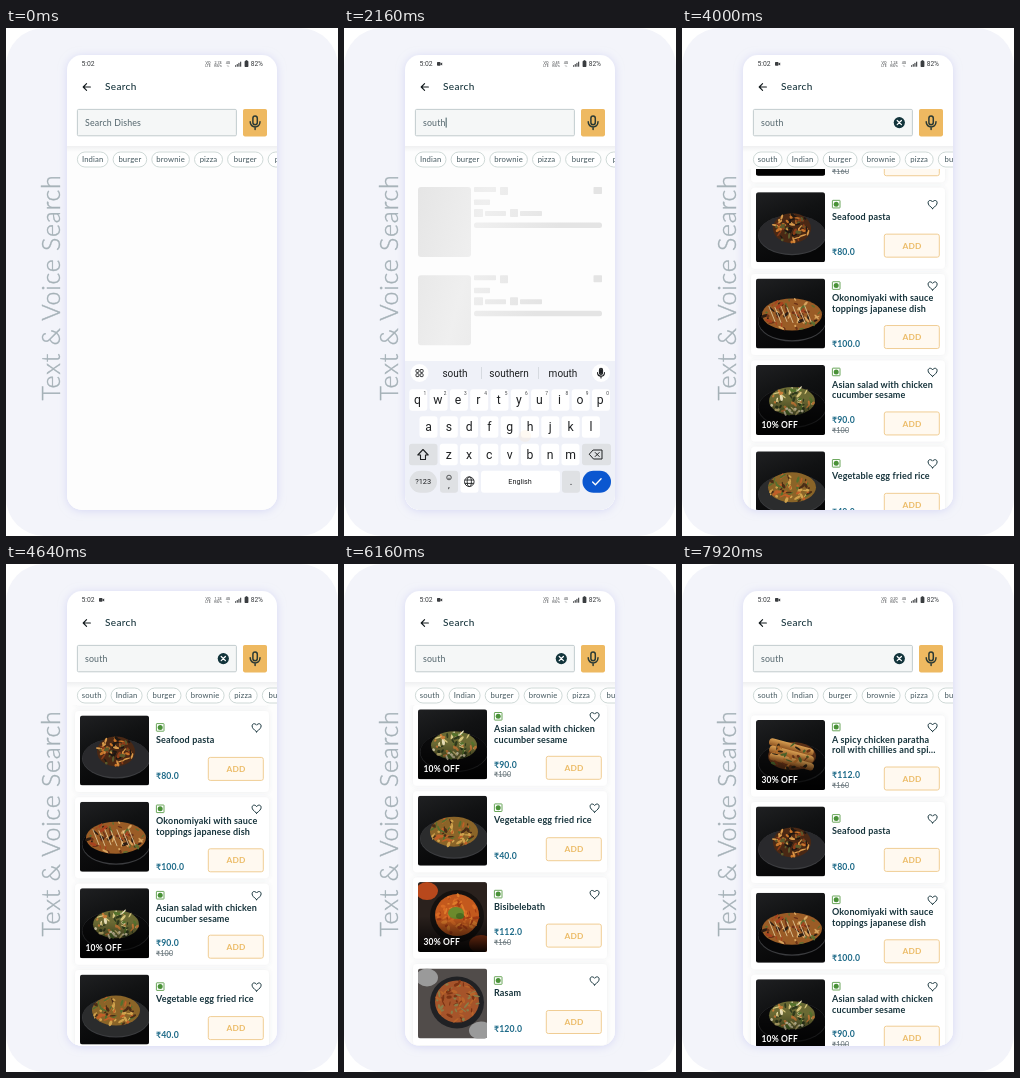
An HTML page that plays this animation: 332x508 px, repeating every 8000 ms.

```html
<!DOCTYPE html>
<html lang="en">
<head>
<meta charset="utf-8">
<title>Text & Voice Search</title>
<style>
  html, body { margin: 0; width: 100%; height: 100%; overflow: hidden; background: #fff; }
  svg { display: block; width: 332px; height: 508px; }
  text { font-family: Lato, "Noto Sans", sans-serif; letter-spacing: .15px; white-space: pre; }
  .sys text, text.sys { font-family: Roboto, "Noto Sans", sans-serif; letter-spacing: 0; }
  .mid { text-anchor: middle; }
  .bold { font-weight: 700; }
  .line { fill: none; stroke-linecap: round; stroke-linejoin: round; }
</style>
</head>
<body>
<svg id="stage" viewBox="0 0 332 508" xmlns="http://www.w3.org/2000/svg"></svg>
<script>
const LOOP = 8000, STEP = 80, PITCH = 86.4, TOP = 156;
const FOCUS = 400, KEYS_IN = 640, SUBMIT = 2360, RESULTS = 2800;
const INK = '#17343c';

const rect = (x, y, w, h, fill, r = 0, more = '') =>
  `<rect x="${x}" y="${y}" width="${w}" height="${h}" rx="${r}" fill="${fill}" ${more}/>`;
const text = (x, y, size, fill, str, more = '') =>
  `<text x="${x}" y="${y}" font-size="${size}" fill="${fill}" ${more}>${str}</text>`;
const oval = (x, y, rx, ry, fill, more = '') =>
  `<ellipse cx="${x}" cy="${y}" rx="${rx}" ry="${ry}" fill="${fill}" ${more}/>`;
const line = (d, stroke, w = 1, more = '') =>
  `<path class="line" d="${d}" stroke="${stroke}" stroke-width="${w}" ${more}/>`;
const group = (id, body, more = '') => `<g id="${id}" ${more}>${body}</g>`;

const clamp = v => Math.max(0, Math.min(1, v));
const ease = v => { v = clamp(v); return v * v * (3 - 2 * v); };

function random(seed) {
  return () => (seed = (seed * 16807) % 2147483647) / 2147483647;
}

// Dishes: title lines, price, old price, discount, load time, picture colours
const dishes = [
  { title: ['A spicy chicken paratha', 'roll with chillies and spi…'], price: 112, was: 160, off: 30, load: 2970,
    plate: '#0b0b0c', food: '#5b3016', bits: ['#48612a', '#b06a28', '#6b3216', '#2a2013'], rx: 24, ry: 14, rolls: true },
  { title: ['Seafood pasta'], price: 80, load: 3120,
    plate: '#29292c', food: '#4a2814', bits: ['#c9752a', '#8c3c18', '#1d1712', '#5b5a2c', '#d99a4a'], rx: 19, ry: 15 },
  { title: ['Okonomiyaki with sauce', 'toppings japanese dish'], price: 100, load: 2870,
    plate: '#070708', food: '#9a5c26', bits: ['#d9a45e', '#6d3418', '#5f6e30', '#a8421f', '#2c1c12'], rx: 30, ry: 16, stripes: true },
  { title: ['Asian salad with chicken', 'cucumber sesame'], price: 90, was: 100, off: 10, load: 2950,
    plate: '#0a0a0b', food: '#6b6a34', bits: ['#d8c67c', '#54722c', '#c77d38', '#e6dcb4', '#2f3a1c'], rx: 23, ry: 14 },
  { title: ['Vegetable egg fried rice'], price: 40, load: 3500,
    plate: '#2b2c2d', food: '#8a6428', bits: ['#55702e', '#c05f28', '#d0a24c', '#4a2c16'], rx: 24, ry: 15 },
  { title: ['Bisibelebath'], price: 112, was: 160, off: 30, load: 4900,
    bg: '#2a211d', plate: '#15110f', food: '#c3591d', bits: ['#de7c2b', '#a63c14', '#d96b24'], bowl: true, herbs: true, side: '#b8481c' },
  { title: ['Rasam'], price: 120, load: 5190,
    bg: '#514c4a', plate: '#202124', food: '#a6542a', bits: ['#b9642a', '#7d3414', '#8a7d48'], bowl: true, side: '#9a9a9a' },
  { title: ['Curd Rice'], price: 80, was: 100, off: 20, load: 5260,
    bg: '#b4b2b2', plate: '#d8d3c8', food: '#f3ecd4', bits: ['#e8cf74', '#fff8e2', '#b9b078'], bowl: true, side: '#d9d6d0' },
  { title: ['South Indian Delight', 'Thali'], price: 180, load: 5300,
    bg: '#dcc79c', plate: '#b39158', food: '#e6c88a', bits: ['#c98f4c', '#f1e3ba', '#a9ae70'], bowl: true, side: '#f0dfb8' }
];

function photo(d, i) {
  const rnd = random(731 * (i + 3));
  const cx = d.bowl ? 113 : 110, cy = d.bowl ? 33 : 36;
  const rx = d.rx || 22, ry = d.ry || 21;
  let s = rect(74, 0, 69, 70, d.bg || 'url(#dark)');
  if (d.bowl) s += oval(83, 9, 11, 9, d.side) + oval(137, 62, 12, 9, d.side) + oval(cx, cy + 1, rx + 5, ry + 5, d.plate);
  else s += oval(cx, 43, 34, 20, '#3b3c3f') + oval(cx, 42.4, 33.6, 19.4, d.plate);
  s += oval(cx, cy, rx, ry, d.food);
  if (d.rolls) for (let k = 0; k < 3; k++)
    s += rect(84 + k * 2, 23 + k * 7, 46, 7.6, 'url(#crust)', 3.8, 'transform="rotate(15 107 36)"');
  for (let k = 0; k < (d.rolls ? 30 : 70); k++) {
    const a = rnd() * 6.283, r = Math.sqrt(rnd()) * .95;
    const x = (cx + Math.cos(a) * rx * r).toFixed(1), y = (cy + Math.sin(a) * ry * r).toFixed(1);
    s += oval(x, y, (1.2 + rnd() * 2.6).toFixed(1), (.6 + rnd()).toFixed(1),
      d.bits[k % d.bits.length], `transform="rotate(${Math.round(rnd() * 180)} ${x} ${y})"`);
  }
  if (d.stripes) for (let k = 0; k < 7; k++)
    s += line(`M${87 + k * 6} ${28 + k % 2}l6 15`, '#e8d3a6', .8);
  if (d.herbs) s += oval(cx - 1, 31, 8, 6, '#6b8a2c') + oval(cx + 3, 34, 4, 3, '#4a6d20');
  return s;
}

function card(d, i) {
  const two = d.title.length > 1, dy = two ? 0 : 5, base = two ? 0 : -5;
  const priceY = (d.was ? 58.3 : 68.3) + base, addY = 47 + base;
  let s = rect(69, -4.5, 194, 81, '#fff', 4, 'filter="url(#soft)"');
  s += '<g clip-path="url(#thumb)">' + rect(74, 0, 69, 70, '#f5f6f6')
    + `<circle id="logo${i}" cx="107" cy="35" r="15" fill="#607f87"/>`
    + group('photo' + i, photo(d, i))
    + (d.off ? rect(74, 34, 69, 36, 'url(#shade)') + text(79.5, 63, 8.5, '#fff', d.off + '% OFF', 'class="bold"') : '')
    + '</g>';
  s += rect(150.4, 3.2 + dy, 7.6, 7.6, '#fff', .5, 'stroke="#5a9c48" stroke-width=".9"')
    + `<circle cx="154.2" cy="${7 + dy}" r="2.5" fill="#4a9238"/>`;
  s += line('M0 4.2C-3 1.8-4.5.3-4.5-1.6-4.5-4.2-1.6-4.7 0-2.4 1.6-4.7 4.5-4.2 4.5-1.6 4.5.3 3 1.8 0 4.2Z',
    INK, 1, `transform="translate(250.6 ${7.2 + dy})"`);
  d.title.forEach((t, k) => s += text(150, 22.6 + k * 10.8 + dy, 9, INK, t, 'class="bold"'));
  s += text(150, priceY, 8.7, '#1d6a88', `₹${d.price}.0`, 'class="bold"');
  if (d.was) s += text(150, priceY + 9.6, 7.2, '#5d6b71', '₹' + d.was) + rect(150, priceY + 6.9, 16, .7, '#5d6b71');
  s += rect(202.3, addY, 55, 23, '#fff9f0', 2, 'stroke="#f0cd94" stroke-width="1"')
    + text(230, addY + 14.6, 8.4, '#ecbc68', 'ADD', 'class="mid bold"');
  return group('card' + i, s);
}

function chips(names, widths) {
  let x = 71.4, s = '';
  names.forEach((n, i) => {
    s += rect(x, 124, widths[i], 15, '#fff', 7.5, 'stroke="#c3d0cd" stroke-width=".8"')
      + text(x + widths[i] / 2, 134.2, 7.7, '#44585f', n, 'class="mid"');
    x += widths[i] + 5.1;
  });
  return s;
}

function skeleton(y) {
  const bars = [[74, 0, 53, 70, 3], [130, 0, 22, 5], [156, 0, 8, 8], [249.5, 0, 8.5, 7], [130, 12.5, 16, 5.5],
    [130, 22, 9, 8], [141, 24, 21, 5], [166, 22, 8, 8], [176, 24, 22, 5], [130, 35.5, 128, 5.5, 2.5]];
  return bars.map(([x, by, w, h, r]) => rect(x, y + by, w, h, 'url(#shimmer)', r || .8)).join('');
}

function mic(x, y, k, color) {
  return `<g transform="translate(${x} ${y}) scale(${k})">`
    + rect(-2.2, -6.5, 4.4, 8.6, 'none', 2.2, `stroke="${color}" stroke-width="1.5"`)
    + line('M-4.9-.8C-4.9 6 4.9 6 4.9-.8M0 4.4V7', color, 1.5) + '</g>';
}

const keyRows = [['qwertyuiop', 74.3, 372], ['asdfghjkl', 84.5, 399], ['zxcvbnm', 104.7, 426.5]];
const keyPos = {};

function keyboard() {
  const gray = '#dfe1e4', ink = '#1e2022';
  let s = rect(61, 333, 210, 160, '#eff1f8');
  s += '<circle cx="75.5" cy="345" r="9" fill="#fff"/><circle cx="257" cy="345" r="9" fill="#fff"/>';
  for (let k = 0; k < 4; k++)
    s += rect(72 + (k % 2) * 4.2, 341.5 + (k >> 1) * 4.2, 2.9, 2.9, 'none', .7, `stroke="${ink}" stroke-width=".9"`);
  s += mic(257, 345, .72, ink) + rect(255.7, 341, 2.6, 5, ink, 1.3);
  s += rect(137, 339, .7, 12, '#ccd0d6') + rect(194, 339, .7, 12, '#ccd0d6');
  for (let k = 0; k < 3; k++) s += text(111 + k * 54, 348.6, 10, ink, '', `id="hint${k}" class="mid"`);
  keyRows.forEach(([row, x0, y], r) => [...row].forEach((c, i) => {
    const x = x0 + i * 20.3;
    keyPos[c] = [x, y];
    s += rect(x - 9, y - 10.7, 18, 21.4, '#fff', 3) + text(x - (r ? 0 : .8), y + 4, 12.2, ink, c, 'class="mid"');
    if (!r) s += text(x + 6.5, y - 5, 4.8, '#44474b', (i + 1) % 10, 'class="mid"');
  }));
  s += rect(65, 415.8, 28.5, 21.4, gray, 3) + line('M79 421.5l5.2 5.5h-2.7v4.5h-5v-4.5h-2.7Z', ink, 1.1);
  s += rect(238, 415.8, 29, 21.4, gray, 3)
    + line('M249.5 422h8.5v9h-8.5l-4-4.5ZM251.2 424.5l4 4M255.2 424.5l-4 4', ink, 1);
  s += rect(65.5, 442.8, 27.5, 22, gray, 11) + text(79.2, 456.3, 7.4, ink, '?123', 'class="mid"');
  s += rect(96, 442.8, 18, 22, gray, 3) + text(105, 459.5, 9, ink, ',', 'class="mid"')
    + '<circle cx="105" cy="449.5" r="2.3" fill="none" stroke="#1e2022" stroke-width=".7"/>' + line('M104 450.2q1 1 2 0', ink, .5);
  s += rect(116.5, 442.8, 18, 22, '#fff', 3)
    + '<g fill="none" stroke="#1e2022" stroke-width=".9"><circle cx="125.3" cy="453.7" r="4.8"/><ellipse cx="125.3" cy="453.7" rx="2.1" ry="4.8"/><path d="M120.8 452h9M120.8 455.4h9"/></g>';
  s += rect(137, 442.8, 79, 22, '#fff', 3) + text(176, 456.3, 7.2, ink, 'English', 'class="mid"');
  s += rect(218, 442.8, 18, 22, gray, 3) + text(227, 456.5, 10, ink, '.', 'class="mid"');
  s += rect(238.5, 442.8, 28.5, 22, '#0b57d0', 11) + line('M248.6 454l2.8 2.8 5.7-6', '#fff', 1.3);
  return s;
}

function statusBar() {
  const ink = '#3a3d40';
  let s = text(75.5, 38.4, 6.8, ink, '5:02');
  s += group('rec', rect(93, 34, 3.5, 3.8, ink, .7) + `<path d="M96.5 35.6l1.7-1.2v3.2l-1.7-1.2z" fill="${ink}"/>`);
  const tiny = (x, a, b, id = '') => text(x, 35.5, 3.7, ink, a, `class="mid" ${id}`) + text(x, 38.9, 3.4, ink, b, 'class="mid"');
  s += tiny(202, 'VO', 'LTE') + tiny(212, '', 'KB/s', 'id="speed"') + tiny(222, '4G', '↑↓');
  for (let k = 0; k < 4; k++) s += rect(229 + k * 1.7, 37.3 - k * 1.2, 1.1, 1.4 + k * 1.2, ink);
  s += rect(238.6, 33, 3.8, 6, ink, .7) + rect(239.6, 32.2, 1.8, 1, ink);
  return s + text(244.7, 38.4, 6.6, ink, '82%');
}

const svg = document.getElementById('stage');
svg.innerHTML = `<defs>
  <clipPath id="screen"><rect x="61" y="27" width="210" height="455" rx="15"/></clipPath>
  <clipPath id="list"><rect x="61" y="141" width="210" height="342"/></clipPath>
  <clipPath id="thumb"><rect x="74" y="0" width="69" height="70" rx="2.5"/></clipPath>
  <linearGradient id="shade" x2="0" y2="1"><stop stop-color="#000" stop-opacity="0"/><stop offset="1" stop-color="#000" stop-opacity=".95"/></linearGradient>
  <linearGradient id="dark" x2=".4" y2="1"><stop stop-color="#1f2022"/><stop offset=".45" stop-color="#111213"/><stop offset="1" stop-color="#070708"/></linearGradient>
  <linearGradient id="crust" x2="0" y2="1"><stop stop-color="#d9a053"/><stop offset="1" stop-color="#8a4f1e"/></linearGradient>
  <linearGradient id="edge" x2="0" y2="1"><stop stop-color="#eff0f1"/><stop offset="1" stop-color="#fdfdfd"/></linearGradient>
  <linearGradient id="shimmer" gradientUnits="userSpaceOnUse" x1="0" y1="0" x2="150" y2="40">
    <stop stop-color="#e4e4e4"/><stop offset=".5" stop-color="#efefef"/><stop offset="1" stop-color="#e4e4e4"/></linearGradient>
  <filter id="soft" x="-10%" y="-15%" width="120%" height="130%"><feDropShadow dx="0" dy="0" stdDeviation="2" flood-color="#5a6470" flood-opacity=".11"/></filter>
  <filter id="halo" x="-15%" y="-10%" width="130%" height="120%"><feDropShadow dx="0" dy="1" stdDeviation="4.5" flood-color="#b9bbef" flood-opacity=".5"/></filter>
  </defs>`
  + rect(0, 0, 332, 508, '#f3f4fa', 38)
  + text(0, 0, 25, '#a5b1b7', 'Text &amp; Voice Search', 'font-weight="300" stroke="#a5b1b7" stroke-width=".4" style="letter-spacing:.72px" transform="translate(54 372.5) rotate(-90)"')
  + rect(61, 27, 210, 455, '#fff', 15, 'filter="url(#halo)"')
  + '<g clip-path="url(#screen)">'
  + rect(61, 118, 210, 365, '#fdfdfd') + rect(61, 118, 210, 6, 'url(#edge)')
  + group('wait', [0, 1, 2, 3].map(k => skeleton(159 + k * 88.2)).join(''))
  + group('results', dishes.map(card).join(''), 'clip-path="url(#list)"')
  + group('chipsA', chips(['Indian', 'burger', 'brownie', 'pizza', 'burger', 'pasta'], [30.6, 33.6, 37.6, 28, 35.4, 32]))
  + group('chipsB', chips(['south', 'Indian', 'burger', 'brownie', 'pizza', 'burger'], [28.6, 31, 33.8, 38, 28, 35.4]))
  + group('bar', statusBar(), 'class="sys"')
  + line('M84.4 59H77.4M80.6 55.6L77.2 59l3.4 3.4', '#10181b', 1.1)
  + text(99, 62.4, 10, INK, 'Search', 'font-weight="500" style="letter-spacing:.35px"')
  + rect(71.4, 81.4, 159, 26.4, '#f5f7f7', 1.2, 'stroke="#bcc7c9" stroke-width=".9"')
  + text(79, 97.9, 8.8, '#53656c', '', 'id="query"')
  + rect(0, 89.6, .8, 10, INK, 0, 'id="caret"')
  + group('clear', `<circle cx="217.3" cy="94.6" r="5.6" fill="#12343b"/>` + line('M215.2 92.5l4.2 4.2M219.4 92.5l-4.2 4.2', '#fff', 1.2))
  + rect(237, 81, 24, 27.4, '#eeb961', 1.8) + mic(249.1, 94.6, 1, '#2b3a35')
  + group('keys', keyboard(), 'class="sys"')
  + '<circle id="touch" r="6" fill="#f6dcb0"/>'
  + '</g>';

const $ = id => document.getElementById(id);
const show = (id, on) => $(id).style.display = on ? '' : 'none';
const pressTimes = [1060, 1280, 1580, 1800, 2020];
const word = 'south';
const hints = [['I', 'the', 'hi'], ['s', 'so', 'is'], ['so', 'sorry', 'do'], ['sou', 'sound', 'soup'],
  ['sout', 'south', 'shout'], ['south', 'southern', 'mouth']];
const speeds = ['2.74', '0.11', '0.45', '305', '1.24', '1.24', '1.16', '0.20'];
const scrollKeys = [[3350, 0], [4200, 91], [4700, 91], [5300, 433], [5880, 433], [6560, -9], [6760, -9], [7080, 0]];

function scrollAt(t) {
  let pos = 0;
  for (let k = 1; k < scrollKeys.length; k++) {
    const [t0, a] = scrollKeys[k - 1], [t1, b] = scrollKeys[k];
    if (t >= t0) pos = a + (b - a) * ease((t - t0) / (t1 - t0));
  }
  return pos;
}

function draw(t) {
  const count = pressTimes.filter(p => t >= p).length;
  const typed = word.slice(0, count), done = t >= RESULTS;

  show('rec', t >= 80);
  $('speed').textContent = speeds[Math.floor(t / 1000)];
  $('query').textContent = typed || 'Search Dishes';
  const since = t - (count ? pressTimes[count - 1] : FOCUS);
  show('caret', t >= FOCUS && t < SUBMIT && since % 1000 < 500);
  $('caret').setAttribute('x', 79.2 + (count ? $('query').getComputedTextLength() : 0));
  show('clear', done);
  show('chipsA', !done);
  show('chipsB', done);

  show('wait', t >= 1120 && !done);
  $('shimmer').setAttribute('gradientTransform', `translate(${(t % 1400) / 1400 * 400 - 110} 0)`);

  const up = ease((t - KEYS_IN) / 260) - ease((t - SUBMIT) / 260);
  show('keys', up > 0);
  $('keys').setAttribute('transform', `translate(0 ${150 * (1 - up)})`);
  hints[count].forEach((h, k) => $('hint' + k).textContent = h);

  show('touch', count && since < 160);
  if (count) {
    const [x, y] = keyPos[word[count - 1]];
    $('touch').setAttribute('transform', `translate(${x - 5} ${y + 9})`);
    $('touch').setAttribute('opacity', .55 * clamp(1 - since / 200));
  }

  show('results', done);
  const offset = scrollAt(t);
  dishes.forEach((d, i) => {
    $('card' + i).setAttribute('transform', `translate(0 ${TOP + i * PITCH - offset})`);
    const p = clamp((t - d.load) / 500);
    $('logo' + i).setAttribute('opacity', clamp(1 - p / .4));
    $('photo' + i).setAttribute('opacity', clamp((p - .4) / .6));
  });
}

function tick() {
  const t = performance.now() % LOOP;
  draw(Math.floor(t / STEP) * STEP);
  requestAnimationFrame(tick);
}
tick();
</script>
</body>
</html>
```
